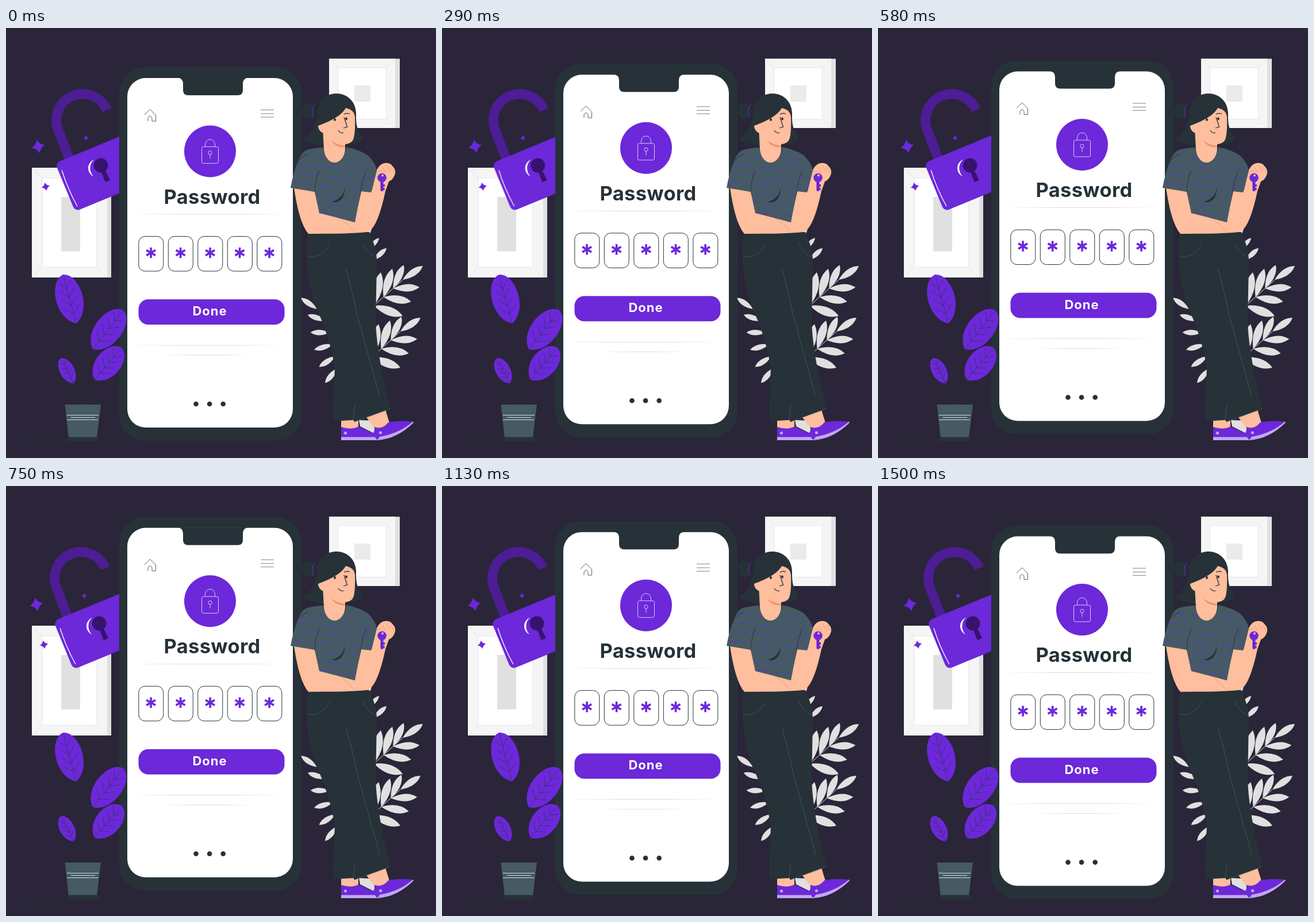
Write an HTML page that moves like this. It is 748 px wide and 748 px high and loops after 1540 ms.

```html
<!DOCTYPE html>
<html lang="en">
<head>
<meta charset="utf-8">
<title>Password</title>
<style>
  html, body { margin: 0; width: 100%; height: 100%; overflow: hidden; background: #2a2538; }
  svg { display: block; width: 100vw; height: 100vh; }
  text { font-family: Inter, "Open Sans", sans-serif; font-weight: 700; text-anchor: middle; }
  .p { fill: #6c28d9; }
  .d { fill: #263238; }
  .s { fill: #455a64; }
  .skin { fill: #ffbe9d; }
  .w { fill: #fff; }
  .g { fill: #e0e0e0; }
  .lilac { fill: #c4a5f5; }
  .ln { fill: none; stroke: #263238; }
  .fold { fill: none; stroke: #eb9481; stroke-width: .9; }
  .edge { fill: none; stroke: #e0e0e0; stroke-width: .8; }
</style>
</head>
<body>
<svg viewBox="0 0 748 748" xmlns="http://www.w3.org/2000/svg">
  <defs>
    <linearGradient id="fade">
      <stop offset="0" stop-color="#ddd" stop-opacity=".3"/>
      <stop offset=".3" stop-color="#ddd"/>
      <stop offset=".7" stop-color="#ddd"/>
      <stop offset="1" stop-color="#ddd" stop-opacity=".2"/>
    </linearGradient>
    <path id="star" d="M0-1Q.25-.25 1 0Q.25.25 0 1Q-.25.25-1 0Q-.25-.25 0-1Z"/>
    <path id="leaf" d="M0 0C.2-.75.95-.6 1 0C.95.6.2.75 0 0Z"/>
    <path id="shirt" d="M524 212Q540 208 552 208C556 243 587 243 592 207Q615 212 629 221Q644 236 645 248L635 286L617 284L607 338L545 322L537 285L495 278Q500 250 510 227Q516 214 524 212Z"/>
    <clipPath id="inShirt"><use href="#shirt"/></clipPath>
  </defs>
  <rect width="748" height="748" fill="#2a2538"/>
  <path d="M40 717.5H708" stroke="#263238" stroke-width=".6"/>

  <g id="pictures"></g>

  <!-- open padlock -->
  <g id="lock">
    <path d="M111 230L91 178A45 45 0 0 1 175.500 143" fill="none" stroke="#4c1d95" stroke-width="17"/>
    <g transform="translate(85.500 235) rotate(-22.400)">
      <rect class="p" width="150" height="91" rx="9"/>
      <path d="M6 16Q3 50 7 84" fill="none" stroke="#fff" stroke-width="1.300"/>
      <path class="w" d="M65 20A16 16 0 0 0 53 47A20 20 0 0 1 65 20Z"/>
      <g fill="#37136e"><circle cx="72" cy="34" r="12.500"/><path d="M69 36H75L77 64H68Z"/></g>
    </g>
    <g class="p">
      <use href="#star" transform="translate(56 206) rotate(-12) scale(12)"/>
      <use href="#star" transform="translate(139 191) rotate(-12) scale(4.700)"/>
      <use href="#star" transform="translate(69 276) rotate(-12) scale(7.400)"/>
    </g>
  </g>

  <g id="phone">
    <rect class="d" x="197" y="68" width="317" height="650" rx="44"/>
    <rect class="w" x="211" y="87" width="288" height="608" rx="32"/>
    <path class="d" d="M298 86.500Q308 87 308 97V108Q308 117 317 117H403Q412 117 412 108V97Q412 87 422 86.500Z"/>
    <path class="ln" stroke-width=".9" stroke-opacity=".85" d="M241 151L250.500 141.500L260.500 151.500V162H254V157Q250.500 149 247 157V162"/>
    <path class="ln" stroke-width=".8" stroke-opacity=".75" d="M443 142.500H466M443 149H466M443 155H466"/>
    <circle class="p" cx="355" cy="214.500" r="45"/>
    <g fill="none" stroke="#d9c8f6">
      <rect x="340.500" y="206.500" width="29" height="29" rx="3"/>
      <path d="M346.500 206V203A8.500 9.300 0 0 1 363.500 203V206M355 220V227"/>
      <circle cx="355" cy="217" r="3.200"/>
    </g>
    <text class="d" x="358.500" y="305.500" font-size="34.500" letter-spacing=".3">Password</text>
    <g fill="url(#fade)">
      <rect x="232" y="323.500" width="244" height="1"/>
      <rect x="229" y="551.500" width="244" height="1"/>
      <rect x="284" y="568.500" width="135" height="1"/>
    </g>
    <g id="pins"></g>
    <rect class="p" x="230.500" y="472" width="254" height="44" rx="17"/>
    <text class="w" x="354.500" y="500" font-size="22" letter-spacing="1">Done</text>
    <g id="dots" class="d"></g>
  </g>

  <!-- potted plant -->
  <path class="ln" stroke-width=".8" d="M122 514Q138 580 133 655M151 559Q138 600 137 655M154 612Q140 630 139 655M118 618Q127 635 129 655"/>
  <g id="plant"></g>
  <path class="s" d="M102.500 655H165L158 713H109Z"/>
  <rect class="d" x="107" y="711.500" width="54" height="7" rx="2"/>
  <path d="M106 673.500H161M113 677.500H155M106 681.500H160" stroke="#d5dde0"/>

  <g id="foliage" class="g" stroke="#e0e0e0"></g>
  <path class="g" d="M614 682L639 683L642 706L616 693Z"/>

  <!-- woman -->
  <g>
    <path class="skin" d="M583 680H613V696Q600 702 583 696Z"/>
    <path class="skin" d="M626 676L660 664L667 687Q655 700 640 695Z"/>
    <path class="p" d="M583 694Q602 700 613 693L640 706L648 712H583Z"/>
    <path class="lilac" d="M583 711.500H648V717H583Z"/>
    <path class="p" d="M638 706Q643 698 641 694Q655 699 665 686Q685 682 709 685C705 692 675 712 645 716Z"/>
    <path class="lilac" d="M646 717Q680 715 709 686.500L708 684.500Q685 705 650 711Z"/>
    <g class="lilac"><circle cx="590.500" cy="704.500" r="2.600"/><circle cx="651.500" cy="704" r="2.600"/></g>

    <path class="d" d="M526 355H632Q646 385 645 410L643 510Q645 570 669 662L606 685L604 682L569.500 684Q570 630 572 590C565 550 553 515 541 490C530 465 516 400 526 355Z"/>
    <path fill="none" stroke="#455a64" stroke-width=".8" d="M591 418Q603 460 611 500L650 641M606 685L669 662M524 397Q548 402 563 376M620 374Q630 394 645 400M607 655L604 682"/>

    <path class="skin" d="M501 278L537 284L545 318L606 338L618 284L636 284L645 247Q652 233 664 235Q670 236 672 240Q678 245 677 253Q674 264 666 267L660 284Q647 345 631 354Q620 358 526 358Q510 340 501 278Z"/>
    <path class="fold" d="M545 319L606 338M578 330Q595 340 604 353M655 243L661 252M662 239L669 251M669 242L675 252M646 250Q652 245 658 254"/>
    <g class="p">
      <circle cx="654" cy="260.500" r="7.800"/>
      <rect x="651.500" y="264" width="5" height="20" rx="2.300"/>
      <path d="M655 272H659V276H655ZM655 278H658.500V282H655Z"/>
      <path stroke="#4c1d95" d="M653 268V282"/>
      <circle class="skin" cx="655" cy="256.500" r="1.900"/>
    </g>

    <path class="d" d="M541 150C540 102 609 102 609 150Q608 180 621 187Q618 192 619 195Q604 207 580 200L552 205Q530 202 516 194Q538 180 541 150Z"/>
    <ellipse class="d" cx="526" cy="144" rx="11" ry="14"/>
    <path class="skin" d="M551 172L553 212C556 242 587 242 590 212V198Z"/>
    <path fill="#eb9470" d="M566 196Q578 204 590 205V207Q574 209 566 196Z"/>
    <path class="skin" d="M551 162Q580 155 591 139Q606 142 607 155Q608 184 604 194C599 206 570 207 558 184C541 184 538 162 551 162Z"/>
    <path class="d" d="M543 170Q582 156 591 139Q605 141 609 153C609 101 540 101 540 158Z"/>
    <path d="M538 132Q529 144 535 156" fill="none" stroke="#6c28d9"/>
    <g class="d"><ellipse cx="572" cy="159.500" rx="1.900" ry="2.400"/><ellipse cx="592" cy="158" rx="1.900" ry="2.400"/></g>
    <path class="ln" stroke-width="1.300" d="M566 154Q571 150 577 152M588 150Q593 147 598 149.500M588 155L593.500 172L587 174M578 178Q581 183 587 182.500"/>

    <use href="#shirt" class="s"/>
    <g id="stripes" clip-path="url(#inShirt)" fill="none" stroke="#6c28d9" stroke-width=".9" stroke-dasharray="26 7 9 12"></g>
    <path class="d" d="M589 276C589 290 578 300 567 302C576 307 591 298 589 276Z"/>
    <path class="ln" stroke-width=".9" d="M537 285Q538 264 545 247M617 284Q619 266 626 249M508 231Q521 219 526 220"/>
  </g>
</svg>
<script>
const fill = (id, html) => { document.getElementById(id).innerHTML = html; };
const times = (n, draw) => Array.from({ length: n }, (_, i) => draw(i)).join('');
const lerp = (a, b, k) => a + (b - a) * k;

// framed picture: bevelled front, side, mat and a grey block
function picture(x, y, w, h, side, bevel, block, tint) {
  const x2 = x + w, y2 = y + h, b = bevel;
  const mat = `M${x + b} ${y + b}H${x2 - b}V${y2 - b}H${x + b}Z`;
  const corner = (cx, cy, sx, sy) => `M${cx} ${cy}l${sx * b} ${sy * b}`;
  const joints = corner(x, y, 1, 1) + corner(x2, y, -1, 1) + corner(x, y2, 1, -1) + corner(x2, y2, -1, -1);
  return `<rect class="g" x="${x}" y="${y}" width="${w + side}" height="${h}"/>
    <rect fill="#f5f5f5" x="${x}" y="${y}" width="${w}" height="${h}"/>
    <path class="w" d="${mat}"/><path class="edge" d="${mat}${joints}"/>
    <path fill="${tint}" d="${block}"/>`;
}
fill('pictures',
  picture(45, 243, 131, 191, 7, 18, 'M96 294H129V388.500H96Z', '#e0e0e0') +
  picture(562, 53.5, 115, 120.500, 8, 15.500, 'M606 100H634V128H606Z', '#ebebeb'));

fill('pins', times(5, i => {
  const x = 230.8 + 51.5 * i;
  return `<rect class="ln" x="${x}" y="362.500" width="43" height="60.500" rx="11"/>` +
    times(3, k => `<rect class="p" x="-1.800" y="-9.200" width="3.600" height="18.400"
      transform="translate(${x + 21.3} 391) rotate(${60 * k})"/>`);
}));
fill('dots', times(3, i => `<circle cx="${330.5 + 23.6 * i}" cy="654" r="4.300"/>`));

// broad leaf from its base, with a midrib and side veins
function broadLeaf(x, y, angle, len, width) {
  const veins = 'M0 0H.95' + times(4, i => {
    const k = .2 + .17 * i;
    return `M${k} 0l.15 ${.33 - .03 * i}M${k} 0l.15 ${.03 * i - .33}`;
  });
  return `<g transform="translate(${x} ${y}) rotate(${angle}) scale(${len} ${width})">
    <use href="#leaf" class="p"/>
    <path class="ln" d="${veins}" stroke-width=".6" vector-effect="non-scaling-stroke"/></g>`;
}
fill('plant',
  broadLeaf(122, 514, -105, 88, 46) + broadLeaf(151, 559, -52, 86, 46) +
  broadLeaf(154, 612, -50, 73, 43) + broadLeaf(118, 618, -118, 49, 25));

// slim leaf given by its base and direction
function slimLeaf(x, y, dx, dy) {
  const side = s => `${dx * .6 - s * dy * .28} ${dy * .6 + s * dx * .28}`;
  return `<path stroke="none" d="M${x} ${y}q${side(1)} ${dx} ${dy}Q${x + dx * .6 + dy * .28} ${y + dy * .6 - dx * .28} ${x} ${y}Z"/>`;
}
// sprig rising to the right: steep leaves above, flat ones below, one at the end
function sprig(x, y) {
  const w = 50, h = -45;
  return `<path fill="none" d="M${x} ${y}l${w} ${h}"/>` + slimLeaf(x + w, y + h, 35, -24) +
    times(3, i => {
      const k = i / 3, px = x + w * k, py = y + h * k;
      return slimLeaf(px, py, 12 + 10 * k, -58 + 26 * k) + slimLeaf(px, py, 50 - 6 * k, 18 - 30 * k);
    });
}
const leftFan = times(6, i => {
  const a = (35 - 17 * i) * Math.PI / 180;
  return slimLeaf(541 + 16 * Math.sqrt(i), 489 + 20.5 * i, -34 * Math.cos(a), -34 * Math.sin(a));
});
const topLeaves = times(3, i => slimLeaf(621 + 9 * i, 368 + 18 * i, 15 + 4 * i, -21));
fill('foliage', sprig(640, 483) + sprig(636, 573) + leftFan + topLeaves);

fill('stripes', times(7, i => {
  const y = 221 + 16 * i;
  return `<path d="M${490 + i % 3 * 8} ${y}Q540 ${y + 2} 575 ${y + 7}T646 ${y + 5}"/>`;
}));

// motion, held at 24 steps per second
const STEPS = 37, LOOP = 1540;
const at = n => Math.round(n * 100 / 24) * 10;
const floatY = n => Math.abs(n - 17.65) * .822 - 14.5;
const keys = [[0, 0], [4, 4.5], [14, -5], [18, -3], [21, 6], [27, 0], [STEPS, 0]];
function swayX(n) {
  const i = keys.findIndex(key => key[0] > n);
  const [a, from] = keys[i - 1], [b, to] = keys[i];
  return lerp(from, to, (n - a) / (b - a));
}
function play(id, pose) {
  const frames = Array.from({ length: STEPS + 1 }, (_, n) => ({
    offset: at(n) / LOOP,
    transform: pose(Math.min(n, STEPS - 1)),
    easing: 'step-end'
  }));
  document.getElementById(id).animate(frames, { duration: LOOP, iterations: Infinity }).startTime = 0;
}
play('phone', n => `translate(0px, ${floatY(n)}px)`);
play('lock', n => `translate(${swayX(n)}px, 0px)`);
</script>
</body>
</html>
```
